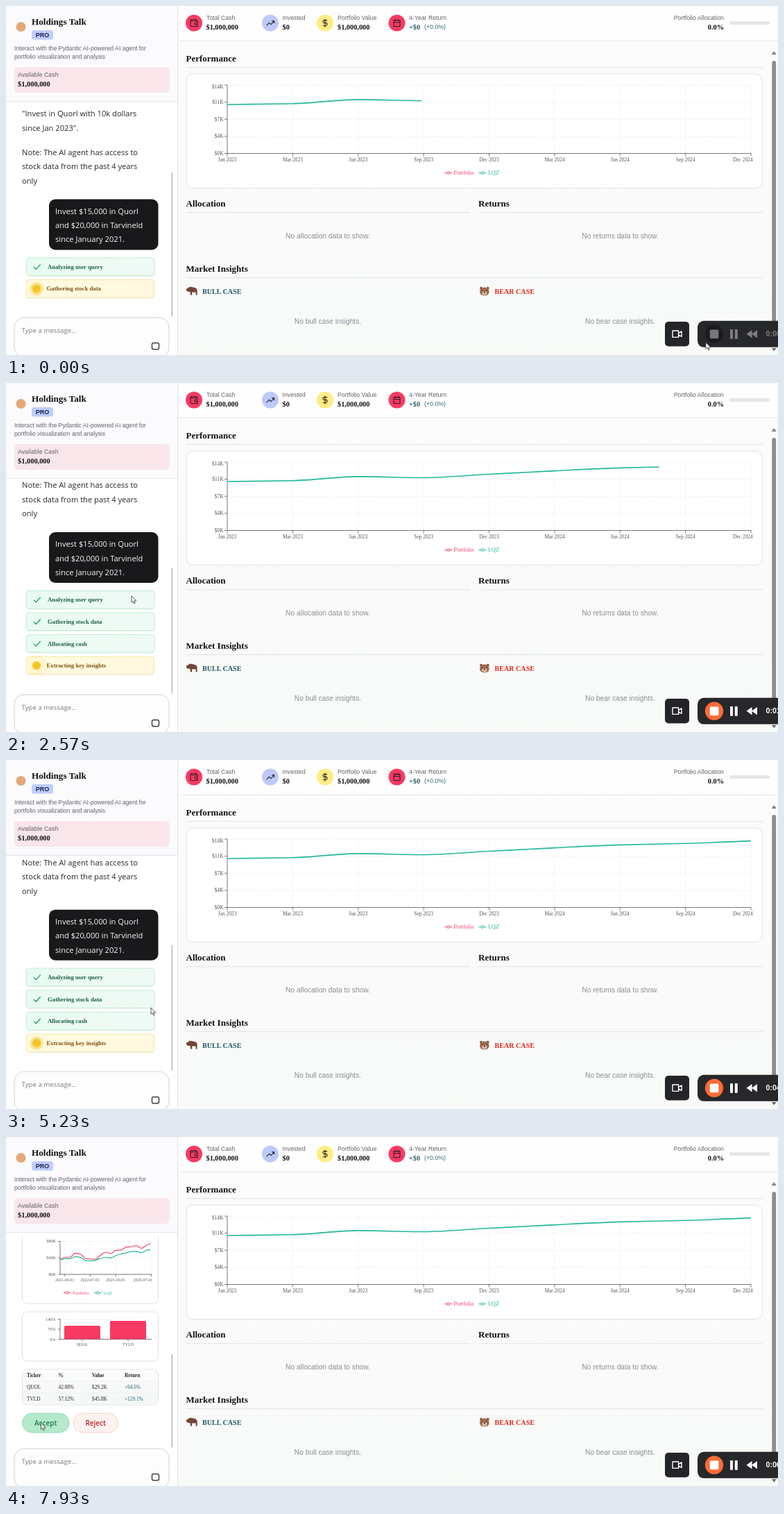
Recreate the animation shown at these times as an HTML page. Size 1113 by 503 pixels, loop 8000 ms.

```html
<!DOCTYPE html>
<html lang="en">
<head>
<meta charset="utf-8">
<title>Portfolio dashboard</title>
<style>
html, body { margin: 0; width: 100%; height: 100%; overflow: hidden; background: #fff; }
svg { display: block; width: 1113px; height: 503px; }
text { white-space: pre; }
.t { font-family: "Liberation Serif", "Times New Roman", serif; }
.b { font-family: "Liberation Serif", "Times New Roman", serif; font-weight: 700; }
.s { font-family: "Liberation Sans", Arial, sans-serif; }
.o { font-family: "Open Sans", "Noto Sans", sans-serif; }
</style>
</head>
<body>
<svg id="stage" viewBox="0 0 1113 503" xmlns="http://www.w3.org/2000/svg"></svg>
<script>
const LOOP = 8000;
const RED = '#f83a63', TEAL = '#22b899', INK = '#111114', MUTED = '#62636d';

// ---------- drawing helpers ----------
const text = (x, y, str, size, cls = 's', fill = INK, extra = '') =>
  `<text x="${x}" y="${y}" font-size="${size}" class="${cls}" fill="${fill}" ${extra}>${str}</text>`;
const mid = 'text-anchor="middle"', end = 'text-anchor="end"';
const rect = (x, y, w, h, r, fill, extra = '') =>
  `<rect x="${x}" y="${y}" width="${w}" height="${h}" rx="${r}" fill="${fill}" ${extra}/>`;
const circle = (x, y, r, fill, extra = '') =>
  `<circle cx="${x}" cy="${y}" r="${r}" fill="${fill}" ${extra}/>`;
const path = (d, stroke, w = 1, extra = '') =>
  `<path d="${d}" fill="none" stroke="${stroke}" stroke-width="${w}" ${extra}/>`;
const shape = (d, fill, extra = '') => `<path d="${d}" fill="${fill}" ${extra}/>`;
const group = (id, body, extra = '') => `<g id="${id}" ${extra}>${body}</g>`;
const card = (x, y, w, h, r) => rect(x, y, w, h, r, '#fff', 'stroke="#dfdfe5" stroke-width="1"');

// Monotone cubic through evenly spaced heights
function curve(x0, step, ys) {
  const d = ys.slice(1).map((y, i) => (y - ys[i]) / step);
  const m = ys.map((_, i) => {
    if (i === 0) return d[0];
    if (i === ys.length - 1) return d[i - 1];
    const a = d[i - 1], b = d[i];
    return a * b <= 0 ? 0 : 2 * a * b / (a + b);
  });
  let out = `M${x0} ${ys[0]}`;
  for (let i = 1; i < ys.length; i++) {
    const x = x0 + step * i, k = step / 3;
    out += `C${x - 2 * k} ${ys[i - 1] + m[i - 1] * k} ${x - k} ${ys[i] - m[i] * k} ${x} ${ys[i]}`;
  }
  return out;
}
const drawn = (cls, d, color, w) => path(d, color, w, `class="${cls}" pathLength="1"`);

function legend(x, y, label, color, size, gap) {
  return path(`M${x} ${y}h10.5`, color, 1) +
    circle(x + 5.2, y, 1.8, '#fff', `stroke="${color}"`) +
    text(x + gap, y + size * .32, label, size, 't', color);
}

// Axes with ticks and dashed grid
function axes(x0, y0, x1, y1, xs, ys, tick) {
  const grid = xs.map(x => `M${x} ${y0}V${y1}`).join('') + ys.map(y => `M${x0} ${y}H${x1}`).join('');
  return path(grid, '#e6e6ec', .7, 'stroke-dasharray="2 2"') +
    path(`M${x0} ${y0}V${y1}H${x1}` + xs.map(x => `M${x} ${y1}v${tick}`).join('') +
      ys.map(y => `M${x0} ${y}h${-tick}`).join(''), '#6a6a6e', .9);
}

// ---------- sidebar ----------
function sidebarHead() {
  return rect(0, 0, 247, 137, 0, '#fbfafc') + path('M0 137.5H247', '#e4e4e8') +
    circle(21.5, 30, 7, '#e3a878') +
    text(37, 26.5, 'Holdings Talk', 13.2, 'b') +
    rect(37, 35, 31, 13.6, 3.5, '#c0ccfc') + text(52.6, 45.1, 'PRO', 9, 's', '#1d2450', mid + ' font-weight="700"') +
    text(12, 64.2, 'Interact with the Pydantic AI-powered AI agent for', 8.68, 's', MUTED) +
    text(12, 75.6, 'portfolio visualization and analysis', 8.68, 's', MUTED) +
    rect(12, 88, 223.5, 37, 5, '#f8e6ea') +
    text(17, 102.3, 'Available Cash', 8.8, 's', MUTED) +
    text(17, 115.6, '$1,000,000', 10.4, 'b');
}

const STEPS = ['Analyzing user query', 'Gathering stock data', 'Allocating cash', 'Extracting key insights'];
function stepRow(label, i) {
  const y = 363 + i * 31.6;
  const box = (fill, edge) => rect(30, y + 1.2, 184, 25.6, 4, '#000', 'opacity=".07"') +
    rect(29, y, 185, 25.6, 4, fill, `stroke="${edge}" stroke-width=".9"`);
  return group('done' + i, box('url(#green)', '#b9ecd2') +
      path(`M40 ${y + 13.2}l3.2 3.2 6.6-7`, '#149a68', 1.3) +
      text(60, y + 15.8, label, 8.72, 'b', '#1a6141')) +
    group('busy' + i, box('url(#amber)', '#f8e59a') +
      circle(44, y + 12.9, 6, '#f7c62a', `id="halo${i}"`) + circle(44, y + 12.9, 6, '#f6c428') +
      text(58.5, y + 15.8, label, 8.72, 'b', '#85510f'));
}

function thread() {
  const lines = [[159.3, '"Invest in Quorl with 10k dollars'], [179.6, 'since Jan 2023".'],
    [214.8, 'Note: The AI agent has access to'], [235.2, 'stock data from the past 4 years'], [255.6, 'only']];
  const asked = ['Invest $15,000 in Quorl', 'and $20,000 in Tarvineld', 'since January 2021.'];
  return lines.map(([y, s]) => text(23, y, s, 11.15, 'o', '#27272a')).join('') +
    rect(62, 278.5, 157.5, 73, 9, '#19191c') +
    asked.map((s, i) => text(71, 299.6 + i * 20.4, s, 11.15, 'o', '#f7f7f8')).join('') +
    STEPS.map(stepRow).join('');
}

const MINE = [177, 173.5, 173, 167.3, 169, 175, 176, 176, 170, 166, 168, 163.3, 163, 158.7, 158, 156.5, 160.5, 156, 153];
const INDEX = [177, 175.5, 175.3, 172.3, 173.5, 178, 178.6, 177.3, 175, 173.5, 174.3, 170.7, 168.5, 167, 165.2, 164.8, 167, 163.2, 162];
function results() {
  const step = 132 / 18;
  const dates = [[84.7, '2021-04-01'], [121.3, '2022-07-01'], [158, '2023-10-01'], [197.5, '2025-07-01']];
  let out = card(23.5, 120, 196, 120, 7) +
    axes(78, 150.5, 210, 198, [84.7, 121.3, 158, 209.6], [150.5, 174.2, 198], 3) +
    ['$80K', '$40K', '$0K'].map((s, i) => text(72, 152.4 + i * 23.8, s, 6.1, 't', '#555', end)).join('') +
    dates.map(([x, s]) => text(x, 208, s, 5.9, 't', '#555', mid)).join('') +
    drawn('mini', curve(78, step, MINE), RED, 1.2) +
    drawn('mini', curve(78, step, INDEX), TEAL, 1.2) +
    legend(83, 224.5, 'Portfolio', RED, 6.6, 13) + legend(127, 224.5, 'LQZ', TEAL, 6.6, 13.3);

  out += card(23.5, 252, 196, 71, 7) +
    axes(78, 262.5, 210, 291.5, [110, 176], [262.5, 277, 291.5], 3) +
    ['140%', '70%', '0%'].map((s, i) => text(71.5, 264.7 + i * 14.4, s, 6.2, 't', '#555', end)).join('') +
    shape('', RED, 'id="bar0"') + shape('', RED, 'id="bar1"') +
    text(110, 301.2, 'QUOL', 6, 't', '#555', mid) + text(176, 301.2, 'TVLD', 6, 't', '#555', mid);

  const cols = [30, 75.5, 124, 171];
  const row = (cells, y, cls) => cells.map((s, i) =>
    text(cols[i], y, s, 7.3, cls, cls === 't' && i === 3 ? '#1d6270' : '#222')).join('');
  out += card(23.5, 335, 196, 51, 7) + rect(24, 335.5, 195, 50, 6.5, 'url(#table)') +
    path('M24 352.2H219M24 369H219', '#ececef', .7) +
    row(['Ticker', '%', 'Value', 'Return'], 346.2, 'b') +
    row(['QUOL', '42.88%', '$29.2K', '+94.6%'], 363, 't') +
    row(['TVLD', '57.12%', '$45.8K', '+129.1%'], 379.6, 't');

  const pill = (x, w, fill, edge, id) => rect(x, 398.3, w, 27.6, 13.8, fill, `stroke="${edge}" id="${id}"`);
  return out + pill(23.5, 67.5, 'url(#accept)', '#aee6c6', 'yes') +
    pill(23.5, 67.5, '#b5e9cb', '#9cdcb8', 'hover') + pill(97, 64.5, '#fcf2f0', '#f3cfc9', 'no') +
    text(57.2, 416, 'Accept', 10, 'o', '#168043', mid + ' font-weight="600"') +
    text(129.2, 416, 'Reject', 10, 'o', '#ba2020', mid + ' font-weight="600"');
}

function sidebar() {
  return rect(0, 0, 247, 503, 0, '#fff') + sidebarHead() +
    `<g clip-path="url(#chat)">${group('thread', thread())}${group('results', results())}</g>` +
    rect(238.4, 240, 1.8, 207, .9, '#bdbdc3', 'id="thumb"') +
    rect(12, 449, 223, 57, 14, '#fdfdfe', 'stroke="#d2d2d8"') +
    text(22.5, 471, 'Type a message...', 9.7, 'o', '#777a82') +
    rect(210.5, 485.6, 10, 9.2, 2, 'none', 'stroke="#222" stroke-width="1.2"') +
    path('M247.5 0V503', '#e2e2e7');
}

// ---------- main area ----------
function topBar() {
  const stat = (cx, tx, color, label, value, icon) =>
    circle(cx, 24.5, 12, color) + path(icon, '#26202c', 1.1, 'stroke-linecap="round" stroke-linejoin="round"') +
    text(tx, 20.4, label, 8.75, 's', MUTED) + value;
  const val = (x, s, color = INK) => text(x, 33.8, s, 10.3, 'b', color);
  return rect(248, 0, 865, 50, 0, '#fefefe') + path('M248 50H1113', '#e3e3e8') +
    stat(271, 289, RED, 'Total Cash', val(288.5, '$1,000,000'),
      'M274.5 21.5v-2h-7.5a1 1 0 0 0 0 2h9v8h-9a1 1 0 0 1-1-1v-8M276 24h-2.5a1.5 1.5 0 0 0 0 3h2.5') +
    stat(381, 398.5, '#bdc8fb', 'Invested', val(398.5, '$0'),
      'M376 27.8l3.5-3.6 2.5 2.4 4.5-4.8M383.6 21.6h3v3') +
    stat(460, 478, '#ffec82', 'Portfolio Value', val(478, '$1,000,000'),
      'M460 18.8v11.4M462.6 20.6h-3.8a1.8 1.8 0 0 0 0 3.8h2.4a1.9 1.9 0 0 1 0 3.8h-4') +
    stat(563.5, 581, RED, '4-Year Return', val(581, '+$0', '#2b5d6b') + text(603, 33.4, '(+0.0%)', 8.8, 's', '#3d6b77'),
      'M559 20.5h9v9h-9zM559 23.5h9M561.3 19v2.4M565.7 19v2.4') +
    text(1035, 20.4, 'Portfolio Allocation', 8.8, 's', MUTED, end) +
    text(1035, 33.8, '0.0%', 10.3, 'b', INK, end) + rect(1043, 22, 58, 5, 2.5, '#e6e6ea');
}

function mainChart() {
  const step = 94.375, xs = [...Array(8)].map((_, i) => 319 + step * (i + 1));
  const dates = ['Jan 2023', 'Mar 2023', 'Jun 2023', 'Sep 2023', 'Dec 2023', 'Mar 2024', 'Jun 2024', 'Sep 2024', 'Dec 2024'];
  return card(260, 98, 830, 164.5, 9) +
    axes(319, 114, 1074, 212.5, [319, ...xs], [114, 138.6, 163.2, 187.9, 212.5], 4) +
    ['$14K', '$11K', '$7K', '$4K', '$0K'].map((s, i) =>
      text(313.5, (i ? 116.5 : 118.5) + i * 24.6, s, 7.4, 't', '#555', end)).join('') +
    dates.map((s, i) => text(i < 8 ? 319 + step * i : 1062.5, 224, s, 7.4, 't', '#555', mid)).join('') +
    drawn('main', curve(319, step, [142, 140.8, 134.9, 136.5, 131.5, 126.6, 122.4, 120.3, 116.6]), TEAL, 1.6) +
    legend(632.5, 240.6, 'Portfolio', RED, 8.2, 13) + legend(681.5, 240.6, 'LQZ', TEAL, 8.2, 13.5);
}

const bull = circle(264, 405.5, 1.2, '#d8c6a8') + circle(262.2, 409, 2.2, '#5a3226') +
  shape('M262 407q3-3.5 8-1.6q5 .4 5.6 4v7h-2v-4h-5.4v4h-2.2l-.6-4.4q-4 .6-4.4-2z', '#75443a');
const bear = circle(685, 406.8, 2, '#86553f') + circle(694.6, 406.8, 2, '#86553f') +
  shape('M683 412q0-6.6 6.8-6.6t6.8 6.6q0 5.4-6.8 5.4t-6.8-5.4z', '#a06a50') +
  shape('M686.3 413.8q0-3 3.5-3t3.5 3-3.5 3-3.5-3z', '#dcbca4') +
  circle(686.7, 410, .7, '#2c1a14') + circle(692.9, 410, .7, '#2c1a14') + circle(689.8, 412.4, 1.1, '#2c1a14');

function mainArea() {
  const head = (x, y, s, x1) => text(x - .5, y, s, 13, 'b') + path(`M${x} ${y + 8.6}H${x1}`, '#e1e2e6');
  const empty = (x, y, s) => text(x, y, s, 10.2, 's', '#8b8e97', mid);
  return rect(248, 50, 865, 453, 0, 'url(#page)') + topBar() +
    head(260, 80, 'Performance', 1091) + mainChart() +
    head(260, 289.2, 'Allocation', 669) + head(681.5, 289.2, 'Returns', 1091) +
    empty(464, 334.8, 'No allocation data to show.') + empty(885.5, 334.8, 'No returns data to show.') +
    head(260, 383, 'Market Insights', 1091) +
    bull + text(283, 414.6, 'BULL CASE', 10.1, 'b', '#1f5866') +
    bear + text(704.5, 414.6, 'BEAR CASE', 10.1, 'b', '#dc2a20') +
    empty(464, 458, 'No bull case insights.') + empty(885.5, 458, 'No bear case insights.') +
    rect(1104.3, 79, 5.8, 395, 2.9, '#8d8d90') +
    shape('M1103.5 70h7.4l-3.7-5z', '#85858a') + shape('M1103.8 493h7l-3.5 4.4z', '#6a6a6e');
}

function recorder() {
  return rect(950, 455, 35, 35.5, 5, '#242528') +
    path('M961 468h8.6v9.4H961zM969.6 471.5l4.4-2.6v7.6l-4.4-2.6', '#fff', 1.4, 'stroke-linejoin="round"') +
    rect(997, 453.8, 140, 38, 9, '#27282b') +
    circle(1021, 472.8, 13, '#1b1b1e') + circle(1021, 472.8, 13.2, '#ff6c37', 'id="rec"') +
    group('keys', rect(1014.8, 466.6, 12.6, 12.6, 1.6, '#fff') +
      rect(1044, 466, 4, 14, 1, '#fff') + rect(1050.8, 466, 4, 14, 1, '#fff') +
      shape('M1075.5 467v11.6l-8-5.8zM1083 467v11.6l-8-5.8z', '#fff') +
      text(1095.5, 476.4, '0:00', 10.6, 's', '#fff', 'id="clock" font-weight="700"'));
}

const gradient = (id, a, b, dir = 'x2="1" y2="0"') =>
  `<linearGradient id="${id}" ${dir}><stop stop-color="${a}"/><stop offset="1" stop-color="${b}"/></linearGradient>`;
const down = 'x2="0" y2="1"';
document.getElementById('stage').innerHTML = '<defs>' +
  gradient('page', '#fcfbfd', '#f7faf7', down) + gradient('green', '#e8fbf2', '#f0faf5') +
  gradient('amber', '#fffbe0', '#fff8e0') + gradient('table', '#fbfcfc', '#f3f7f5', down) +
  gradient('accept', '#e4faec', '#effaf3') +
  '<clipPath id="chat"><rect x="0" y="143" width="247" height="304.5"/></clipPath></defs>' +
  mainArea() + sidebar() + recorder() +
  group('cursor', shape('M0 0V9.4l2.2-2 1.5 3.5 1.5-.6-1.5-3.4h3.1z', '#fff', 'stroke="#4a4a50" stroke-width=".9" stroke-linejoin="round"'));

// ---------- motion ----------
const $ = id => document.getElementById(id);
const all = cls => [...document.querySelectorAll('.' + cls)];
const clamp = x => Math.max(0, Math.min(1, x));
const show = (id, on) => $(id).setAttribute('display', on ? 'inline' : 'none');
const smooth = p => p * p * (3 - 2 * p);

// CSS "ease": cubic-bezier(.25, .1, .25, 1)
function ease(x) {
  x = clamp(x);
  let lo = 0, hi = 1;
  for (let i = 0; i < 24; i++) {
    const u = (lo + hi) / 2, v = 1 - u;
    if (.75 * v * v * u + .75 * v * u * u + u * u * u < x) lo = u; else hi = u;
  }
  const v = 1 - lo;
  return .3 * v * v * lo + 3 * v * lo * lo + lo * lo * lo;
}

const STEP3 = 1775, STEP4 = 1980, RESULT = 6430, MINI = 6640;
const CURSOR = [[0, 1009, 485], [350, 1040, 512], [1150, 600, 512], [1430, 181, 307], [3050, 181, 307],
  [3650, 211, 359.5], [4100, 211, 359.5], [4270, 209, 357], [7650, 209, 357], [7880, 50.5, 412], [8000, 50.5, 412]];
const mainLine = all('main'), miniLines = all('mini');

function reveal(line, p) {
  line.setAttribute('stroke-dasharray', `${p} 2`);
  line.setAttribute('stroke-opacity', p > 0 ? 1 : 0);
}

function bar(id, x, top, p) {
  const y = 291.5 - (291.5 - top) * p, r = Math.min(2, 291.5 - y);
  $(id).setAttribute('d', `M${x} 291.5V${y + r}q0 ${-r} ${r} ${-r}H${x + 52 - r}q${r} 0 ${r} ${r}V291.5z`);
}

function render(t) {
  const start = t < 1785 ? -350 : t < RESULT ? 1785 : RESULT;
  mainLine.forEach(l => reveal(l, ease((t - start) / 1500)));

  const busy = t < STEP3 ? 1 : t < STEP4 ? 2 : 3;
  const phase = ((t - (busy < 3 ? 730 : 1980) + LOOP) % 1000) / 700;
  STEPS.forEach((_, i) => {
    show('done' + i, i < busy);
    show('busy' + i, i === busy);
    $('halo' + i).setAttribute('r', 6 + 10 * clamp(phase));
    $('halo' + i).setAttribute('opacity', .7 * (1 - clamp(phase)));
  });

  const finished = t >= RESULT;
  show('thread', !finished);
  show('results', finished);
  const scroll = [0, -31.8, t < 4285 ? -63.5 : -62.8][busy - 1];
  $('thread').setAttribute('transform', `translate(0 ${scroll})`);
  const top = finished ? 313 : [240, 254, 266.5][busy - 1];
  $('thumb').setAttribute('y', top);
  $('thumb').setAttribute('height', 447.5 - top);

  miniLines.forEach(l => reveal(l, ease((t - MINI) / 1500)));
  const grow = ease((t - MINI) / 400);
  bar('bar0', 84, 272, grow);
  bar('bar1', 150, 265, grow);
  $('hover').setAttribute('opacity', clamp((t - 7820) / 110));

  const on = clamp((t - 30) / 400);
  $('rec').setAttribute('opacity', on);
  $('keys').setAttribute('opacity', .4 + .6 * on);
  $('clock').textContent = '0:0' + Math.max(0, Math.floor((t - 5) / 1000 - 1) + 1 - (t < 2005 ? 1 : 1) + 0);

  const i = Math.max(1, CURSOR.findIndex(k => k[0] > t));
  const a = CURSOR[i - 1], b = CURSOR[i], p = smooth(clamp((t - a[0]) / (b[0] - a[0])));
  $('cursor').setAttribute('transform', `translate(${a[1] + (b[1] - a[1]) * p} ${a[2] + (b[2] - a[2]) * p})`);
}

let origin = null;
function frame(now) {
  if (origin === null) origin = now;
  render((now - origin) % LOOP);
  requestAnimationFrame(frame);
}
render(0);
requestAnimationFrame(frame);
</script>
</body>
</html>
```
